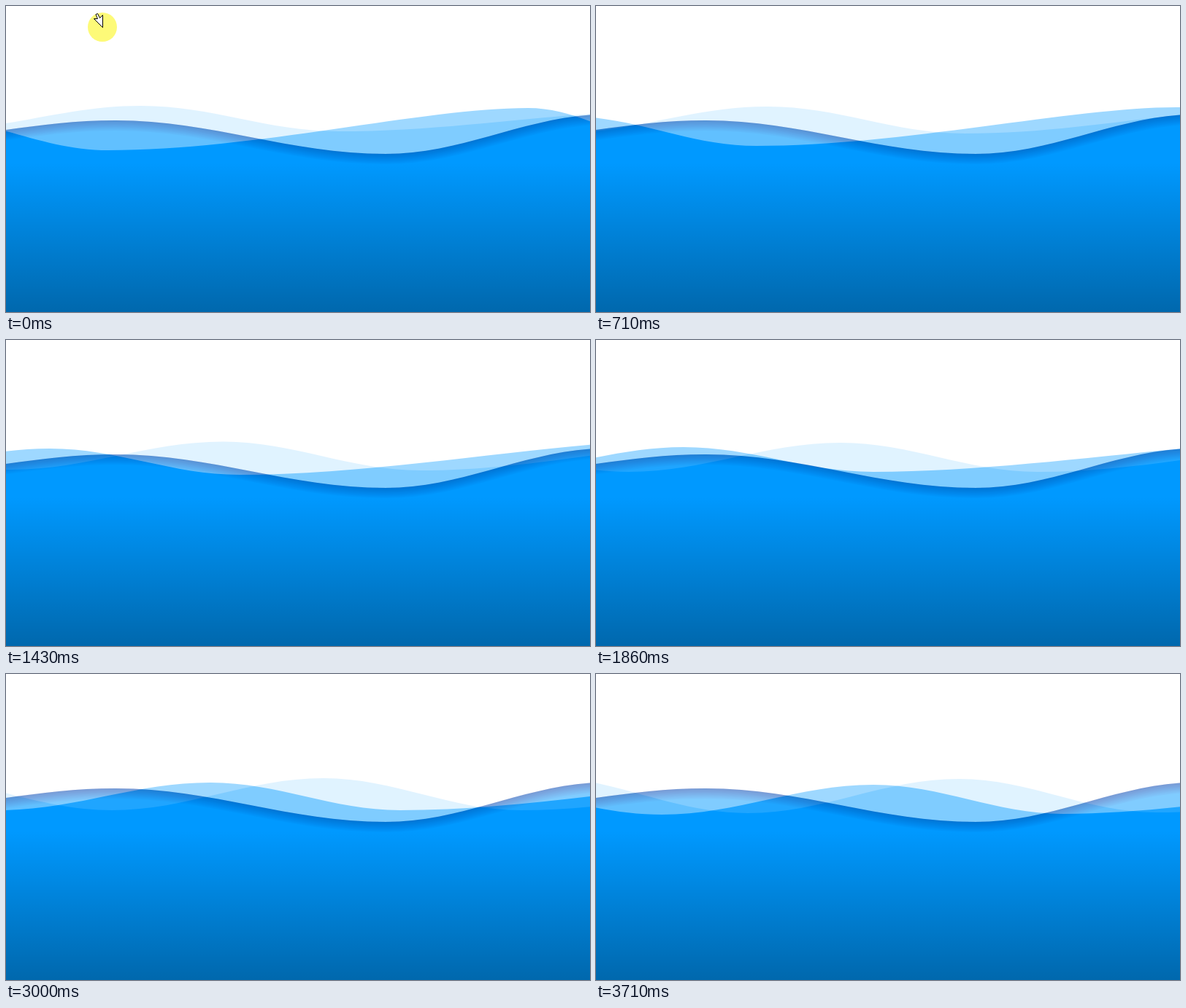
Animation, 800 px wide and 420 px high, one loop 3.85 s. Source, as an HTML page with a canvas:

```html
<!DOCTYPE html>
<html lang="en">
<head>
<meta charset="utf-8">
<title>Waves</title>
<style>
  html, body { margin: 0; width: 100%; height: 100%; overflow: hidden; background: #fff; }
  canvas { display: block; width: 800px; height: 420px; }
</style>
</head>
<body>
<canvas id="stage" width="800" height="420"></canvas>
<script>
const ctx = document.getElementById('stage').getContext('2d');
const LOOP = 3850, HOLD = 290;

// Steps at which the heights of the crests and troughs are given.
const KEYS = [0, 4, 9, 12, 16, 20, 25];

// Each wave: ink taken away from white, drift per step,
// and its turning points { x, y (fixed or one per key), out/in handle }.
const pale = {
  ink: 'rgb(31,12,0)', drift: 12.5,
  points: [
    { x: -395, y: 140 },
    { x: -105, y: [171, 175, 178, 181, 184, 187, 191] },
    { x: 185, y: [137, 138, 139.5, 141, 142, 143, 144] },
    { x: 455, y: [172, 175, 179, 181, 184, 187, 190] },
    { x: 915, y: [144, 139, 139, 139, 141, 141, 141] }
  ]
};
const middle = {
  ink: 'rgb(97,39,0)', drift: 20,
  points: [
    { x: -700, y: 150 },
    { x: -410, y: [186, 186, 186, 186, 186, 187, 193] },
    { x: -120, y: [151, 151, 149, 147, 147, 149, 152] },
    { x: 140, y: [198, 192, 185, 181, 180.5, 187, 192], out: 0.35 },
    { x: 715, y: [140, 139, 139, 140, 140, 137, 134], in: 0.25 },
    { x: 940, y: 198 }
  ]
};
const front = {
  ink: 'rgb(127,51,0)', drift: 0,
  points: [
    { x: -170, y: 186 },
    { x: 150, y: 157 },
    { x: 520, y: 203 },
    { x: 825, y: 148.5 }
  ]
};

function heightAt(y, step) {
  if (!Array.isArray(y)) return y;
  let k = 0;
  while (k < KEYS.length - 2 && step >= KEYS[k + 1]) k++;
  const part = (step - KEYS[k]) / (KEYS[k + 1] - KEYS[k]);
  return y[k] + (y[k + 1] - y[k]) * part;
}

function wavePath(wave, step) {
  const pts = wave.points.map(p => ({
    x: p.x + wave.drift * step,
    y: heightAt(p.y, step),
    out: p.out || 0.36,
    in: p.in || 0.36
  }));
  const path = new Path2D();
  path.moveTo(pts[0].x, pts[0].y);
  for (let i = 1; i < pts.length; i++) {
    const a = pts[i - 1], b = pts[i], w = b.x - a.x;
    path.bezierCurveTo(a.x + w * a.out, a.y, b.x - w * b.in, b.y, b.x, b.y);
  }
  path.lineTo(pts[pts.length - 1].x, 460);
  path.lineTo(pts[0].x, 460);
  path.closePath();
  return path;
}

// Soft dark rim just inside the edge of the front wave.
function shadeRim(path) {
  ctx.save();
  ctx.clip(path);
  ctx.globalCompositeOperation = 'multiply';
  ctx.strokeStyle = 'rgb(253,247,250)';
  for (let k = 1; k <= 8; k++) {
    ctx.lineWidth = 3.5 * k;
    ctx.stroke(path);
  }
  ctx.restore();
}

const depth = ctx.createLinearGradient(0, 215, 0, 420);
depth.addColorStop(0, 'rgba(0,0,0,0)');
depth.addColorStop(1, 'rgba(0,0,0,0.32)');

const arrow = new Path2D(
  'M132.5 29.5V12.5L128.5 16.5L125.5 10.5L123 11.5L125.5 17.5H120.5Z');

function drawPointer() {
  ctx.fillStyle = '#fdfa78';
  ctx.beginPath();
  ctx.arc(132, 29, 20, 0, Math.PI * 2);
  ctx.fill();
  ctx.fillStyle = '#fff';
  ctx.fill(arrow);
  ctx.strokeStyle = '#000';
  ctx.lineWidth = 1;
  ctx.stroke(arrow);
}

function draw(step) {
  ctx.globalCompositeOperation = 'source-over';
  ctx.fillStyle = '#fff';
  ctx.fillRect(0, 0, 800, 420);

  // Inks add up: all three together leave the full blue.
  ctx.globalCompositeOperation = 'difference';
  for (const wave of [pale, middle, front]) {
    ctx.fillStyle = wave.ink;
    ctx.fill(wavePath(wave, step));
  }

  ctx.globalCompositeOperation = 'source-over';
  shadeRim(wavePath(front, step));
  ctx.fillStyle = depth;
  ctx.fillRect(0, 215, 800, 205);
  if (step === 0) drawPointer();
}

// Seven steps a second after the opening hold, on a 10 ms clock.
function stepAt(ms) {
  if (ms < HOLD) return 0;
  const tick = Math.floor(ms / 10) * 10 + 10;
  return Math.min(25, Math.ceil((tick - HOLD) * 0.007));
}

const start = performance.now();
let shown = -1;
function frame() {
  const step = stepAt((performance.now() - start) % LOOP);
  if (step !== shown) draw(shown = step);
  requestAnimationFrame(frame);
}
frame();
</script>
</body>
</html>
```
